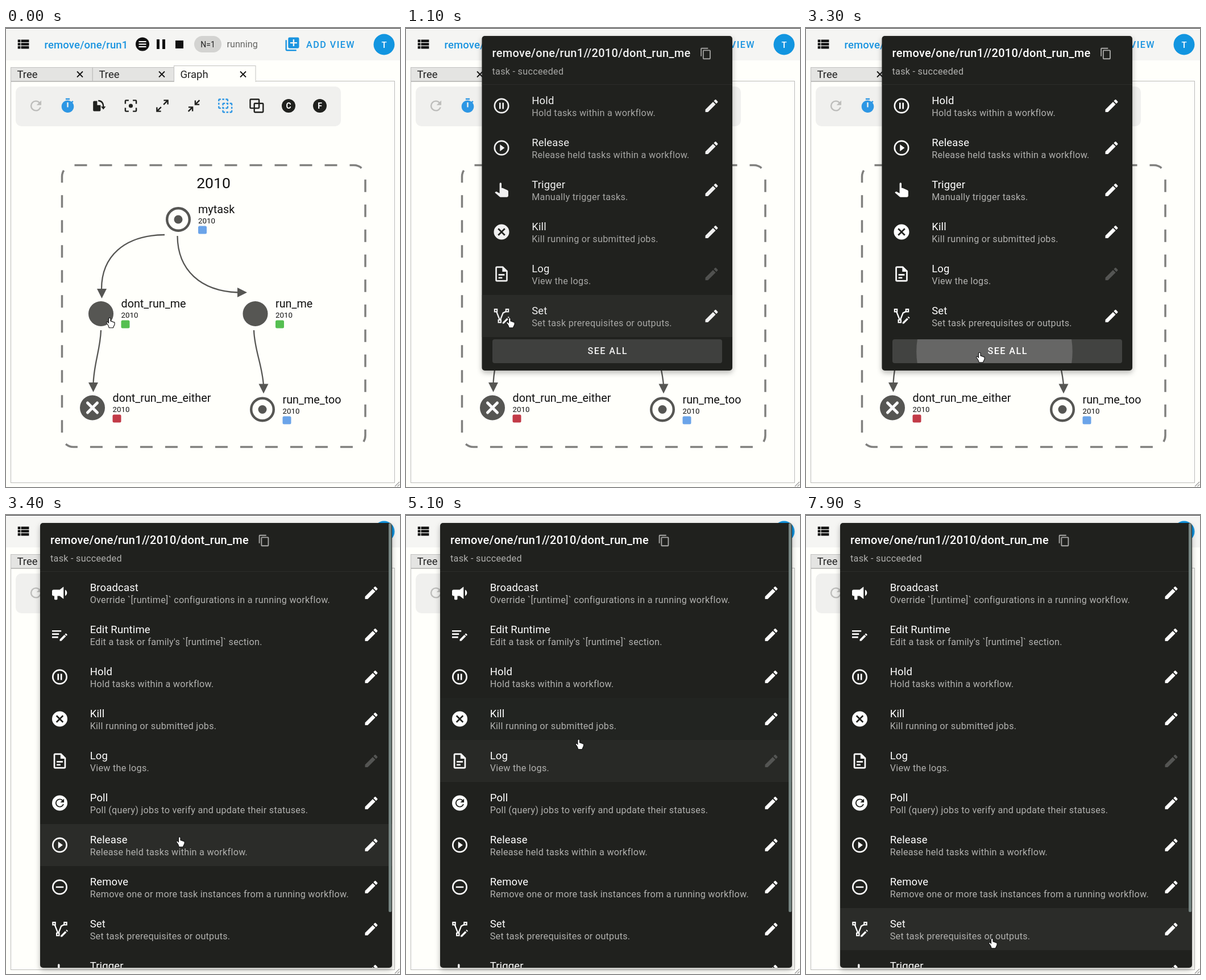
An HTML page for the animation above (8 s loop, 693 by 808 pixels).

```html
<!DOCTYPE html>
<html lang="en">
<head>
<meta charset="utf-8">
<title>Workflow graph menu</title>
<style>
html, body { margin: 0; width: 100%; height: 100%; overflow: hidden; background: #fffffb; }
svg { display: block; width: 693px; height: 808px; font-family: Roboto, sans-serif; }
text { white-space: pre; }
.menu { filter: drop-shadow(0 4px 5px rgba(0, 0, 0, .28)); }
</style>
</head>
<body>
<svg id="stage" viewBox="0 0 693 808"></svg>
<script>
const INK = '#20211e', BLUE = '#1a94e0', NODE = '#565653', LOOP = 8000;

// Icon shapes on a 24 unit grid
const disc = 'M2,12a10,10 0 1,0 20,0a10,10 0 1,0-20,0Z';
const ring = disc + 'M4,12a8,8 0 1,0 16,0a8,8 0 1,0-16,0Z';
const cross = 'M15.59,7L12,10.59L8.41,7L7,8.41L10.59,12L7,15.59L8.41,17L12,13.41L15.59,17L17,15.59L13.41,12L17,8.41Z';
const nib = 'M20.04,10.13C19.9,10.13 19.76,10.19 19.65,10.3L18.65,11.3L20.7,13.35L21.7,12.35C21.92,12.14 21.92,11.79 21.7,11.58L20.42,10.3C20.31,10.19 20.18,10.13 20.04,10.13M18.07,11.88L12,17.94V20H14.06L20.12,13.93Z';
const shapes = {
  list: 'M9,5V9H21V5ZM9,19H21V15H9ZM9,14H21V10H9ZM4,9H8V5H4ZM4,19H8V15H4ZM4,14H8V10H4Z',
  pencil: 'M20.71,7.04C21.1,6.65 21.1,6 20.71,5.63L18.37,3.29C18,2.9 17.35,2.9 16.96,3.29L15.12,5.12L18.87,8.87M3,17.25V21H6.75L17.81,9.93L14.06,6.18Z',
  hold: ring + 'M13,16V8H15V16ZM9,16V8H11V16Z',
  release: ring + 'M10,16.5L16,12L10,7.5Z',
  remove: ring + 'M7,11H17V13H7Z',
  kill: disc + cross,
  hand: 'M10,9A1,1 0 0,1 12,9V13.47L13.21,13.6L18.15,15.79C18.68,16.03 19,16.56 19,17.14V21.5C18.97,22.32 18.32,22.97 17.5,23H11C10.62,23 10.26,22.85 10,22.57L5.1,18.37L5.84,17.6C6.03,17.39 6.3,17.28 6.58,17.28H6.8L10,19Z',
  log: 'M6,2A2,2 0 0,0 4,4V20A2,2 0 0,0 6,22H18A2,2 0 0,0 20,20V8L14,2ZM6,4H13V9H18V20H6ZM8,12V14H16V12ZM8,16V18H13V16Z',
  horn: 'M12,8H4A2,2 0 0,0 2,10V14A2,2 0 0,0 4,16H5V20A1,1 0 0,0 6,21H8A1,1 0 0,0 9,20V16H12L17,20V4ZM21.5,12C21.5,13.71 20.54,15.26 19,16V8C20.53,8.75 21.5,10.3 21.5,12Z',
  edit: 'M2,6V8H14V6ZM2,10V12H11V10ZM2,14V16H10V14Z' + nib,
  refresh: 'M17.65,6.35C16.2,4.9 14.21,4 12,4A8,8 0 0,0 4,12A8,8 0 0,0 12,20C15.73,20 18.84,17.45 19.73,14H17.65C16.83,16.33 14.61,18 12,18A6,6 0 0,1 6,12A6,6 0 0,1 12,6C13.66,6 15.14,6.69 16.22,7.78L13,11H20V4Z',
  copy: 'M19,5H8A2,2 0 0,0 6,7V21A2,2 0 0,0 8,23H19A2,2 0 0,0 21,21V7A2,2 0 0,0 19,5ZM19,21H8V7H19ZM16,1H4A2,2 0 0,0 2,3V17H4V3H16Z',
  timer: 'M19.03,7.39L20.45,5.97C20,5.46 19.55,5 19.04,4.56L17.62,6C16.07,4.74 14.12,4 12,4A9,9 0 0,0 3,13A9,9 0 0,0 12,22C17,22 21,17.97 21,13C21,10.88 20.26,8.93 19.03,7.39M13,14H11V7H13ZM15,1H9V3H15Z',
  turn: 'M4.5,5H9V11H14V18.5A1.5,1.5 0 0,1 12.5,20H4.5A1.5,1.5 0 0,1 3,18.5V6.5A1.5,1.5 0 0,1 4.5,5ZM10.5,3.5C16,3.5 19,7 19,13H21.5L18,17.5L14.5,13H17C17,8.5 15,6 10.5,5.5Z',
  focus: 'M5,15H3V19A2,2 0 0,0 5,21H9V19H5ZM5,5H9V3H5A2,2 0 0,0 3,5V9H5ZM19,3H15V5H19V9H21V5A2,2 0 0,0 19,3ZM19,19H15V21H19A2,2 0 0,0 21,19V15H19ZM9,12a3,3 0 1,0 6,0a3,3 0 1,0-6,0Z',
  expand: 'M10,21V19H6.41L10.91,14.5L9.5,13.09L5,17.59V14H3V21ZM14.5,10.91L19,6.41V10H21V3H14V5H17.59L13.09,9.5Z',
  collapse: 'M19.5,3.09L15,7.59V4H13V11H20V9H16.41L20.91,4.5ZM4,13V15H7.59L3.09,19.5L4.5,20.91L9,16.41V20H11V13Z',
  select: 'M3,1H5V3H3V5H1V3A2,2 0 0,1 3,1M14,1A2,2 0 0,1 16,3V5H14V3H12V1ZM20,7A2,2 0 0,1 22,9V11H20V9H18V7ZM22,20A2,2 0 0,1 20,22H18V20H20V18H22ZM20,13H22V16H20ZM13,9V7H16V10H14V9ZM13,22V20H16V22ZM9,22A2,2 0 0,1 7,20V18H9V20H11V22ZM7,16V13H9V14H10V16ZM7,3V1H10V3ZM3,16A2,2 0 0,1 1,14V12H3V14H5V16ZM1,7H3V10H1ZM9,7H11V9H9V11H7V9A2,2 0 0,1 9,7M16,14A2,2 0 0,1 14,16H12V14H14V12H16Z',
  add: 'M19,11H15V15H13V11H9V9H13V5H15V9H19ZM20,2H8A2,2 0 0,0 6,4V16A2,2 0 0,0 8,18H20A2,2 0 0,0 22,16V4A2,2 0 0,0 20,2ZM4,6H2V20A2,2 0 0,0 4,22H18V20H4Z',
  pointer: 'M10,2A2,2 0 0,1 12,4V8.5C12,8.5 14,8.25 14,9.25C14,9.25 16,9 16,10C16,10 18,9.75 18,10.75C18,10.75 20,10.5 20,11.5V15C20,16 17,21 17,22H9C9,22 7,15 4,13C4,13 3,7 8,12V4A2,2 0 0,1 10,2Z'
};

const place = (x, y, s, body) =>
  `<g transform="translate(${x} ${y}) scale(${s}) translate(-12 -12)">${body}</g>`;
const icon = (name, x, y, fill = INK, s = 1.2) =>
  place(x, y, s, `<path d="${shapes[name]}" fill="${fill}" fill-rule="evenodd"/>`);
const rect = (x, y, w, h, fill, rx = 0, more = '') =>
  `<rect x="${x}" y="${y}" width="${w}" height="${h}" rx="${rx}" fill="${fill}" ${more}/>`;
const circle = (x, y, r, fill, more = '') =>
  `<circle cx="${x}" cy="${y}" r="${r}" fill="${fill}" ${more}/>`;
const line = (d, stroke, w, more = '') =>
  `<path d="${d}" fill="none" stroke="${stroke}" stroke-width="${w}" ${more}/>`;
const text = (s, x, y, size, fill, gap = 0, more = '') =>
  `<text x="${x}" y="${y}" font-size="${size}" fill="${fill}" letter-spacing="${gap}" ${more}>${s}</text>`;
const BOLD = 'font-weight="500"', MID = 'text-anchor="middle"';

function header() {
  return rect(0, 0, 693, 57, '#f5f5f3') + rect(0, 0, 693, 1, '#333')
    + icon('list', 30, 28.5, '#111', 1.158)
    + text('remove/one/run1', 67.5, 35.5, 18.5, BLUE, .15, BOLD)
    + circle(240, 28.5, 12, '#111') + line('M233.5,24H246.5M233.5,28.5H246.5M233.5,33H246.5', '#fff', 2)
    + rect(265, 20, 5, 17, '#111') + rect(275, 20, 5, 17, '#111') + rect(298, 22, 14, 14, '#111')
    + rect(331, 14, 48, 29, '#d3d3d1', 14.5) + text('N=1', 355, 34, 14, '#222', 0, MID)
    + text('running', 388.5, 34, 16.2, '#666664')
    + icon('add', 503.5, 28.5, BLUE)
    + text('ADD VIEW', 528, 35, 16.2, BLUE, 1.44, BOLD)
    + circle(665, 29, 18.5, '#1295e0') + text('T', 665, 34.5, 15, '#fff', 0, MID + BOLD);
}

function tabs() {
  const tab = (name, x, y, fill) =>
    rect(x + .5, y + .5, 143.5, 94 - y, fill, 0, 'stroke="#c2c2c0"')
    + text(name, x + 11.5, 88, 18.5, '#222')
    + line(`M${x + 117},76.5l10,10m0,-10l-10,10`, '#111', 1.8);
  return rect(8.5, 93.5, 675, 707, '#fffffb', 0, 'stroke="#bcbcba"')
    + tab('Tree', 8, 69, '#e4e4e2') + tab('Tree', 152, 69, '#e4e4e2')
    + line('M8,93.5H295', '#bcbcba', 1)
    + tab('Graph', 295, 66, '#fffffb') + rect(296, 92, 142.5, 4, '#fffffb')
    + line('M684,807L692,799M688.5,807L692,803.5', '#999', 1.2);
}

function toolbar() {
  const square = a => rect(a, a, 13, 13, 'none', 1, `stroke="${INK}" stroke-width="2"`);
  const letter = (c, x) => circle(x, 137, 12, INK) + text(c, x, 142, 14, '#fff', 0, MID + ' font-weight="700"');
  return rect(17, 103, 572, 70, '#f0f0ee', 10)
    + icon('refresh', 52.5, 137, '#bdbdbb') + icon('timer', 108.5, 137, '#2e97e4')
    + ['turn', 'focus', 'expand', 'collapse'].map((n, i) => icon(n, 164 + 55.5 * i, 137)).join('')
    + icon('select', 386.3, 137.5, '#2e97e4') + place(441.5, 137.5, 1.2, square(2) + square(8))
    + letter('C', 497) + letter('F', 552);
}

function graph() {
  const label = (name, x, y, color) => text(name, x, y, 19.8, '#111') + text('2010', x, y + 18, 13.3, '#111')
    + rect(x, y + 22.5, 15, 14, color, 2.5);
  const target = (x, y) => circle(x, y, 19.8, 'none', `stroke="${NODE}" stroke-width="4.4"`) + circle(x, y, 7.5, NODE);
  const edge = d => line(d, NODE, 2.3);
  const arrow = (x, y, turn = 0) => `<path d="M-8.5,-17H8.5L0,0Z" fill="${NODE}" transform="translate(${x} ${y}) rotate(${turn})"/>`;
  const green = '#55bf51', blue = '#6ba4e9', red = '#c23a47';
  return rect(98.5, 241.5, 533.5, 496, 'none', 20,
      'stroke="#80807e" stroke-width="3.5" stroke-dasharray="22" stroke-dashoffset="-2"')
    + text('2010', 365, 281.5, 26.5, '#111', 0, MID)
    + edge('M279,364C208,365 167,402 168,462') + arrow(168.5, 476)
    + edge('M301.5,366C302,426 342,463 408,465.5') + arrow(424, 465.5, -90)
    + edge('M167,532C166,566 154,592 153.5,628') + arrow(153.5, 641)
    + edge('M436,532C437,567 451,594 453,630') + arrow(453, 643.5)
    + target(303, 337) + label('mytask', 338, 326, blue)
    + circle(167, 503, 22, NODE) + label('dont_run_me', 202.5, 492, green)
    + circle(438.5, 503, 22, NODE) + label('run_me', 474, 492, green)
    + circle(152, 668.5, 22, NODE) + line('M143.5,660l17,17m0,-17l-17,17', '#fff', 5, 'stroke-linecap="round"')
    + label('dont_run_me_either', 187.5, 658, red)
    + target(451, 671.5) + label('run_me_too', 486.5, 661, blue);
}

const commands = {
  Broadcast: ['horn', 'Override `[runtime]` configurations in a running workflow.'],
  'Edit Runtime': ['edit', "Edit a task or family's `[runtime]` section."],
  Hold: ['hold', 'Hold tasks within a workflow.'],
  Kill: ['kill', 'Kill running or submitted jobs.'],
  Log: ['log', 'View the logs.'],
  Poll: ['poll', 'Poll (query) jobs to verify and update their statuses.'],
  Release: ['release', 'Release held tasks within a workflow.'],
  Remove: ['remove', 'Remove one or more task instances from a running workflow.'],
  Set: ['set', 'Set task prerequisites or outputs.'],
  Trigger: ['hand', 'Manually trigger tasks.']
};
const shortList = ['Hold', 'Release', 'Trigger', 'Kill', 'Log', 'Set'];
const fullList = Object.keys(commands);

function commandIcon(name, x, y) {
  if (name == 'hand') return icon(name, x, y - 6, '#fff', 1.7);
  if (name == 'poll') return circle(x, y, 13.5, '#fff') + icon('refresh', x, y, INK, .95);
  if (name == 'set') {
    const box = (a, b) => rect(a, b, 3.2, 3.2, INK, 0, 'stroke="#fff" stroke-width="1.6"');
    return place(x, y, 1.35, line('M5,5L10,18L14,8L20,5', '#fff', 1.7) + box(3, 3.2) + box(17.8, 3.2) + box(8, 17.2)
      + `<path d="${nib}" fill="#fff" stroke="${INK}" stroke-width=".6" transform="translate(1 2.4)"/>`);
  }
  return icon(name, x, y, '#fff', 1.35);
}

function menu(id, left, width, height, list, extra) {
  const rows = list.map((name, i) => {
    const [pic, about] = commands[name], y = 137 + 74 * i;
    return rect(left, y - 37, width, 74, '#2b2c29', 0, 'class="hover" opacity="0"')
      + commandIcon(pic, left + 34.5, y)
      + text(name, left + 87.7, y - 3.5, 18.5, '#fff', .15)
      + text(about, left + 87.7, y + 18, 16.2, '#b1b1af', .26)
      + icon('pencil', left + width - 36.5, y, name == 'Log' ? '#545553' : '#fff', 1.22);
  }).join('');
  return `<g id="${id}" class="menu"><clipPath id="${id}Clip">${rect(left, 14, width, height, INK, 5)}</clipPath>`
    + rect(left, 14, width, height, INK, 5)
    + `<g id="${id}Body" clip-path="url(#${id}Clip)">`
    + text('remove/one/run1//2010/dont_run_me', left + 18, 51, 20, '#fff', .3, BOLD)
    + icon('copy', left + 394, 45, '#a9a9a7', .93)
    + text('task - succeeded', left + 18, 82, 16.2, '#b1b1af', .28)
    + rect(left, 99, width, 1, '#2d2e2b') + rows + extra + '</g></g>';
}

const $ = id => document.getElementById(id);
$('stage').innerHTML = header() + tabs() + toolbar() + graph()
  + menu('small', 133.5, 440.5, 589, shortList,
      rect(152, 548, 404, 42, '#424341', 4)
      + `<clipPath id="button">${rect(152, 548, 404, 42, INK, 4)}</clipPath>`
      + `<g clip-path="url(#button)"><circle id="ripple" fill="#fff" opacity=".19"/></g>`
      + text('SEE ALL', 319.5, 573.8, 16.2, '#fff', 1.44, BOLD))
  + menu('full', 60, 619, 783, fullList, rect(673, 14, 5, 685, '#768582', 2.5))
  + `<g id="cursor">${place(0, 0, .88, `<path d="${shapes.pointer}" fill="#fff" stroke="#111" stroke-width="1.3"/>`)}</g>`;

// Pointer path: time, x, y
const path = [
  [0, 184, 519], [1500, 184, 519], [1600, 194, 528], [1700, 232, 564], [1800, 270, 595], [2100, 296, 600],
  [2800, 296, 600], [3000, 307, 580], [3300, 307, 580], [3500, 307, 571], [3900, 307, 571], [4000, 305, 557],
  [4700, 305, 557], [5600, 306, 212], [5800, 308, 145], [5900, 308, 160], [6000, 308, 207], [6500, 312, 502],
  [7100, 312, 502], [7700, 331, 768], [7800, 331, 768], [7900, 329, 754], [LOOP, 329, 754]
];
function pointer(t) {
  const i = Math.max(1, path.findIndex(p => p[0] >= t));
  const [t0, x0, y0] = path[i - 1], [t1, x1, y1] = path[i], k = (t - t0) / (t1 - t0);
  return [x0 + (x1 - x0) * k, y0 + (y1 - y0) * k];
}

// cubic-bezier(x1, 0, x2, 1)
function ease(x, x1, x2) {
  if (x <= 0 || x >= 1) return x <= 0 ? 0 : 1;
  let lo = 0, hi = 1, u;
  for (let n = 0; n < 24; n++) {
    u = (lo + hi) / 2;
    const at = 3 * (1 - u) ** 2 * u * x1 + 3 * (1 - u) * u * u * x2 + u ** 3;
    if (at < x) lo = u; else hi = u;
  }
  return 3 * u * u - 2 * u ** 3;
}

const OPEN = 766, PRESS = 3150, SWAP = 3400;
const hovers = { small: $('small').querySelectorAll('.hover'), full: $('full').querySelectorAll('.hover') };

function draw(t) {
  const [x, y] = pointer(t), name = t < SWAP ? 'small' : 'full';
  $('cursor').setAttribute('transform', `translate(${x} ${y})`);
  $('small').style.display = t >= 800 && t < SWAP ? '' : 'none';
  $('full').style.display = t >= SWAP ? '' : 'none';

  const p = ease((t - OPEN) / 225, 0, .2), fade = ease((t - OPEN) / 450, .4, .2);
  $('small').setAttribute('transform', `translate(134 460) scale(${.1 + .9 * p} ${.075 + .925 * p}) translate(-134 -460)`);
  $('small').setAttribute('opacity', p);
  $('smallBody').setAttribute('opacity', Math.max(0, (fade - .33) / .67));

  // Row highlight follows the pointer with a short fade
  hovers[name].forEach((row, i) => {
    let on = 0;
    for (let lag = 0; lag < 240; lag += 60) {
      const tip = pointer(Math.max(0, t - lag))[1] - 8;
      if (Math.floor((tip - 100) / 74) == i) on += .25;
    }
    row.setAttribute('opacity', on);
  });

  const age = Math.max(0, t - PRESS);
  $('ripple').setAttribute('cx', 307 + .163 * age);
  $('ripple').setAttribute('cy', 580 - .07 * age);
  $('ripple').setAttribute('r', .915 * age);
}

const start = performance.now();
function tick() {
  const t = (performance.now() - start) % LOOP;
  draw(Math.floor(t / 100) * 100);
  requestAnimationFrame(tick);
}
tick();
</script>
</body>
</html>
```
